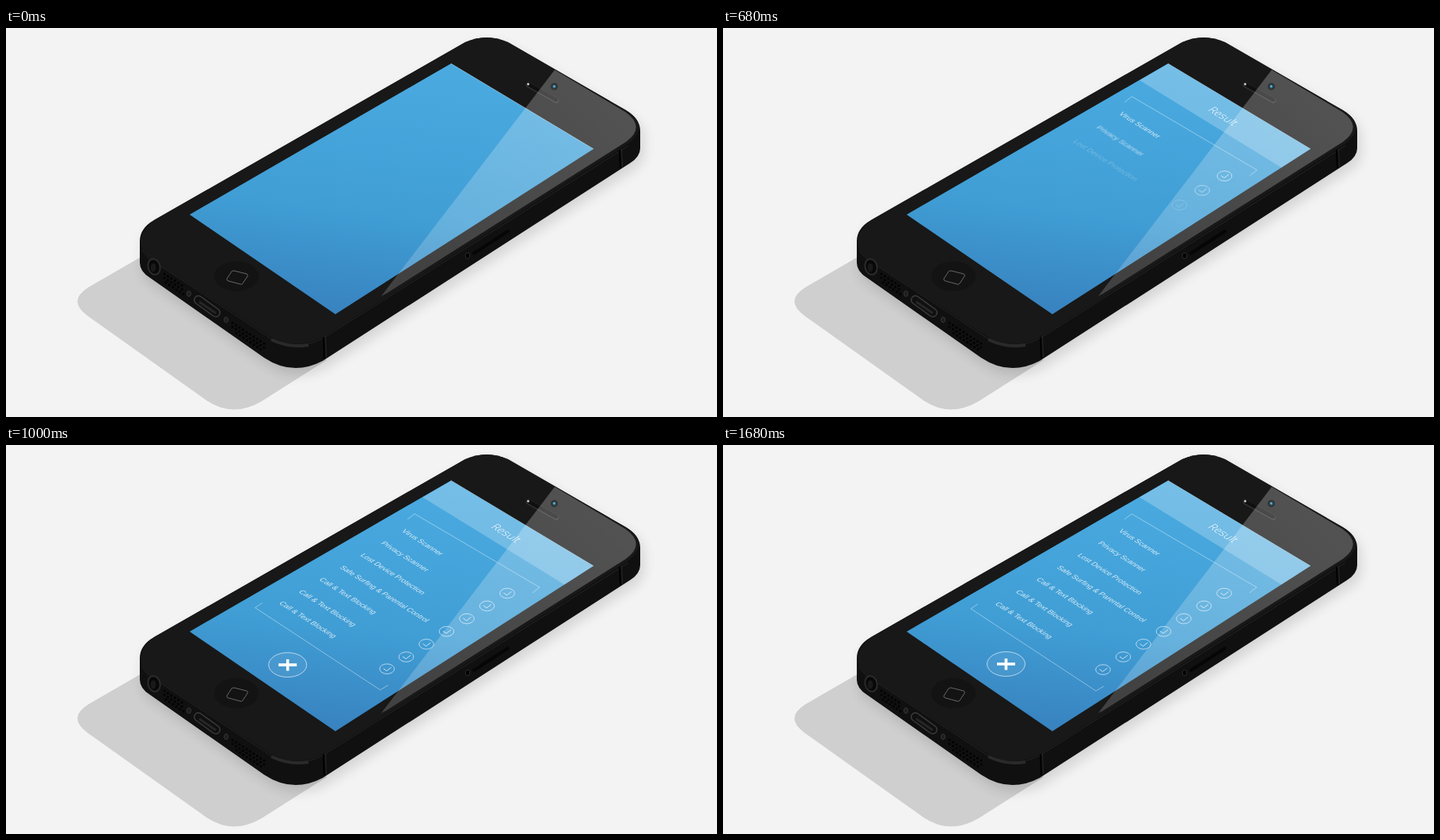
Write an HTML page that moves like this. It is 898 px wide and 492 px high and loops after 2040 ms.

```html
<!DOCTYPE html>
<html lang="en">
<head>
<meta charset="utf-8">
<title>Result screen</title>
<style>
  html, body { margin: 0; width: 100%; height: 100%; overflow: hidden; background: #f3f3f3; }
  svg { display: block; width: 898px; height: 492px; }
  text { fill: #fff; }
  .title { font: 300 21px "Open Sans", sans-serif; }
  .label { font: 13.8px "Liberation Sans", Arial, sans-serif; fill-opacity: .8; }
  .line, .ring, .tick { fill: none; stroke: #fff; stroke-width: 1; }
  .line { stroke-opacity: .4; }
  .ring { stroke-opacity: .6; }
  .tick { stroke-opacity: .7; }
  .holes { stroke: #030303; stroke-width: 3.2; stroke-linecap: round; stroke-dasharray: 0 5.3; }
</style>
</head>
<body>
<svg viewBox="0 0 898 492">
  <defs>
    <linearGradient id="blue" gradientUnits="userSpaceOnUse" x1="520" y1="50" x2="480" y2="365">
      <stop offset="0" stop-color="#4aaae0"/>
      <stop offset=".6" stop-color="#409ed5"/>
      <stop offset="1" stop-color="#3883c0"/>
    </linearGradient>
    <linearGradient id="shine" gradientUnits="userSpaceOnUse" x1="740" y1="90" x2="520" y2="310">
      <stop offset="0" stop-color="#fff" stop-opacity=".25"/>
      <stop offset="1" stop-color="#fff" stop-opacity=".18"/>
    </linearGradient>
    <filter id="soft" x="-10%" y="-10%" width="120%" height="125%">
      <feGaussianBlur stdDeviation="8"/>
    </filter>
    <path id="body" d="M187 243L580 18Q607 6 634 18L783 104Q801 115 801 130V152Q801 163 788 171L400 421Q362 441 326 417L182 316Q169 308 169 297V270Q169 253 187 243Z"/>
    <path id="face" d="M187 243L580 18Q607 6 634 18L783 104Q815 124 785 147L402 390Q368 409 335 391L184 293Q155 270 187 243Z"/>
    <clipPath id="glass"><path d="M562 45L742 153L416 362L232 236Z"/></clipPath>
  </defs>

  <rect width="898" height="492" fill="#f3f3f3"/>
  <path fill="#cfcfcf" d="M180 284L104 328Q77 345 103 364L249 468Q284 495 323 472L405 420Z"/>
  <use href="#body" transform="translate(4 8)" opacity=".13" filter="url(#soft)"/>

  <use href="#body" fill="#101010"/>
  <use href="#face" fill="#181818"/>
  <path d="M172 280Q175 288 186 295L335 393Q368 410 401 392L786 149" fill="none" stroke="#242424" stroke-width="1"/>
  <path d="M335 394Q358 405 382 401" fill="none" stroke="#2a2a2a" stroke-width="4"/>
  <path d="M401 391L402 418M775 154L776 177" stroke="#000" stroke-width="2"/>
  <path d="M403.5 390L404.5 416M777.5 153L778.5 176" stroke="#282828" stroke-width="1"/>

  <!-- bottom edge -->
  <ellipse cx="187" cy="302" rx="7.5" ry="10" transform="rotate(-15 187 302)" fill="#080808" stroke="#2b2b2b" stroke-width="2"/>
  <ellipse cx="186" cy="303" rx="3.5" ry="5.5" fill="#191919"/>
  <g class="holes">
    <path d="M200 311L226 328M200 316L226 333M202 322L226 338"/>
    <path d="M286 373L329 401M286 378L329 406M291 386L326 409"/>
  </g>
  <path d="M243 344L265 360" stroke="#3a3a3a" stroke-width="12" stroke-linecap="round"/>
  <path d="M243 344L265 360" stroke="#101010" stroke-width="9" stroke-linecap="round"/>
  <path d="M245 347L264 360" stroke="#262626" stroke-width="3" stroke-linecap="round"/>
  <g fill="#1d1d1d" stroke="#363636">
    <ellipse cx="231" cy="336" rx="2.5" ry="3.5"/>
    <ellipse cx="278" cy="369" rx="2.5" ry="3.5"/>
  </g>

  <!-- side slot -->
  <path d="M591 285L634 257" stroke="#060606" stroke-width="4" stroke-linecap="round"/>
  <ellipse cx="583" cy="288" rx="2.8" ry="3.8" fill="#000" stroke="#2a2a2a"/>

  <!-- home key -->
  <ellipse cx="291" cy="314" rx="28" ry="19" fill="#131313"/>
  <path d="M288 307L304 311Q306 312 305 314L299 323Q298 325 296 324L281 320Q278 319 279 317L285 308Q286 307 288 307Z" fill="none" stroke="#666" stroke-width="1"/>

  <!-- display -->
  <path d="M562 45L742 153L416 362L232 236Z" fill="url(#blue)"/>
  <g clip-path="url(#glass)">
    <path id="bar" d="M562 45L742 153L706 177L526 66Z" fill="#fff" fill-opacity=".23"/>
    <g id="title"><text class="title" transform="matrix(.5625 .345 -.58 .336 611.5 104)">Result</text></g>
    <g id="list"></g>
    <g id="close">
      <ellipse class="ring" cx="357.5" cy="277" rx="24" ry="15.5" style="fill:#fff;fill-opacity:.06"/>
      <path d="M346 277H369M357.5 270V284.5" stroke="#fff" stroke-width="3.6"/>
    </g>
  </g>
  <path d="M562 45L742 153" stroke="#b4dcf2" stroke-width="1" opacity=".6"/>

  <!-- earpiece -->
  <path d="M660 72L695 91.5" stroke="#3a3a3a" stroke-width="6.5" stroke-linecap="round"/>
  <path d="M660 71.5L695 91" stroke="#101010" stroke-width="5" stroke-linecap="round"/>

  <path d="M693 53L474 339L480 336L783 144Q809 125 782 106Z" fill="url(#shine)"/>

  <!-- sensor and camera -->
  <circle cx="659.5" cy="71" r="1.5" fill="#ccc"/>
  <circle cx="692.5" cy="74" r="4.6" fill="#30363a"/>
  <circle cx="692.5" cy="74" r="2" fill="#3585a6"/>
  <circle cx="692.2" cy="73.6" r=".8" fill="#a5d5e6"/>
</svg>

<script>
const LOOP = 2040, LIST_START = 560, STAGGER = 40;
const $ = id => document.getElementById(id);

const labels = ['Virus Scanner', 'Privacy Scanner', 'Lost Device Protection',
  'Safe Surfing & Parental Control', 'Call & Text Blocking',
  'Call & Text Blocking', 'Call & Text Blocking'];

function add(parent, tag, attrs, text) {
  const el = document.createElementNS('http://www.w3.org/2000/svg', tag);
  for (const key in attrs) el.setAttribute(key, attrs[key]);
  if (text) el.textContent = text;
  return parent.appendChild(el);
}

// Each part swings in from (dx, dy), crosses its place after `swing` ms and rests after `span` ms.
const parts = [
  { el: $('bar'), start: 0, dx: 40, dy: -25, swing: 310, span: 560, fade: 1 },
  { el: $('title'), start: 0, dx: 10, dy: -6, swing: 310, span: 560, fade: 260 },
  { el: $('close'), start: 840, dx: -50, dy: 31, swing: 170, span: 280, fade: 120 },
];

function listItem(order) {
  const el = add($('list'), 'g', {});
  parts.push({ el, start: LIST_START + order * STAGGER, dx: -8, dy: 6, swing: 113, span: 240, fade: 110 });
  return el;
}

add(listItem(0), 'path', { class: 'line', d: 'M507 94L516 87L674 180L665 187' });
labels.forEach((label, i) => {
  const row = listItem(i);
  const x = 499 - 26 * i, y = 109 + 15.4 * i;
  const cx = 633 - 25.5 * i, cy = 187.5 + 16.1 * i;
  add(row, 'text', { class: 'label', transform: `matrix(.567 .36 -.58 .336 ${x} ${y})` }, label);
  add(row, 'ellipse', { class: 'ring', cx, cy, rx: 9.3, ry: 6.3 });
  add(row, 'path', { class: 'tick', d: `M${cx - 4.5} ${cy - .5}l4 3l6-4.5` });
});
add(listItem(labels.length), 'path', { class: 'line', d: 'M322 201L313 207L471 311L481 305' });

const clamp = v => Math.min(1, Math.max(0, v));
const smooth = v => v * v * (3 - 2 * v);

function pose({ el, start, dx, dy, swing, span, fade }, time) {
  const t = Math.max(0, time - start);
  const away = Math.cos(Math.PI / 2 * t / swing) * (1 - clamp(t / span));
  el.setAttribute('transform', `translate(${dx * away} ${dy * away})`);
  el.setAttribute('opacity', smooth(clamp(t / fade)));
}

const begin = performance.now();
function draw() {
  const time = (performance.now() - begin) % LOOP;
  parts.forEach(part => pose(part, time));
  requestAnimationFrame(draw);
}
draw();
</script>
</body>
</html>
```
